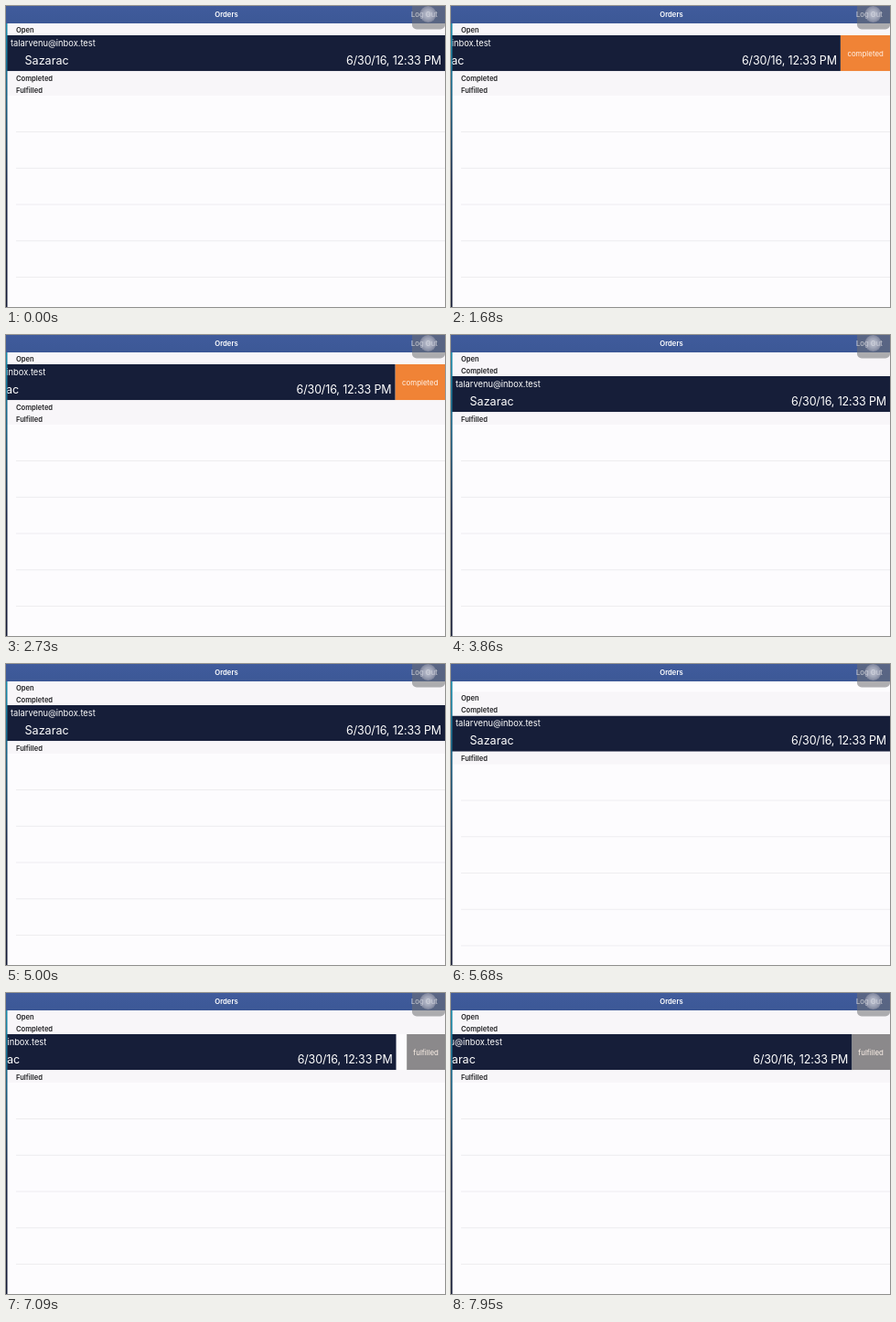
These frames come from a looping animation (480x329 px, 8 s). An HTML page:

```html
<!DOCTYPE html>
<html lang="en">
<head>
<meta charset="utf-8">
<title>Orders</title>
<style>
  html, body { margin: 0; width: 100%; height: 100%; overflow: hidden; background: #fdfcfe; }
  svg { display: block; width: 100vw; height: 100vh; font-family: Inter, "Liberation Sans", sans-serif; }
  .head { font-size: 7.6px; font-weight: 600; fill: #202023; }
  .nav { font-size: 7.7px; }
  .email { font-size: 9.3px; }
  .drink { font-size: 12.6px; }
  .date { font-size: 12.5px; letter-spacing: -.15px; }
  .action { font-size: 7.9px; fill: #fff3ea; text-anchor: middle; }
</style>
</head>
<body>
<svg viewBox="0 0 480 329">
  <defs>
    <linearGradient id="bar" x2="0" y2="1">
      <stop stop-color="#405b9c"/><stop offset="1" stop-color="#3c5896"/>
    </linearGradient>
    <linearGradient id="edge" x2="0" y2="1">
      <stop stop-color="#1694b5"/><stop offset=".3" stop-color="#176184"/>
      <stop offset=".6" stop-color="#182444"/><stop offset="1" stop-color="#141a35"/>
    </linearGradient>
    <radialGradient id="knob">
      <stop stop-color="#e2e3ea"/><stop offset=".55" stop-color="#b9bccb"/>
      <stop offset="1" stop-color="#8a8fa4"/>
    </radialGradient>
    <clipPath id="cell"><rect width="480" height="39.2"/></clipPath>
  </defs>

  <rect width="480" height="329" fill="#fdfcfe"/>
  <g id="list">
    <g id="lines" stroke="#e7e6ea" stroke-width=".7"></g>
    <rect y="19" width="480" height="79" fill="#f8f6f9"/>
    <text class="head" x="11" y="28.8">Open</text>
    <text class="head" x="11" id="completedHead">Completed</text>
    <text class="head" x="11" y="94.5">Fulfilled</text>
    <g id="row">
      <g clip-path="url(#cell)">
        <rect width="480" height="39.2" fill="#fdfcfe"/>
        <g id="action">
          <rect id="actionBox" width="110" height="39.2"/>
          <text id="actionText" class="action" y="23"></text>
        </g>
        <g id="content" fill="#fff">
          <rect width="480" height="39.2" fill="#161e39"/>
          <text class="email" x="5" y="11.6">talarvenu@inbox.test</text>
          <text class="drink" x="20.5" y="32">Sazarac</text>
          <text class="date" x="476" y="31.6" text-anchor="end">6/30/16, 12:33 PM</text>
        </g>
      </g>
    </g>
  </g>

  <rect width="1.5" height="329" fill="url(#edge)"/>
  <rect width="480" height="19" fill="url(#bar)"/>
  <text class="nav" x="241" y="11.8" text-anchor="middle" font-weight="600" fill="#fff">Orders</text>
  <text class="nav" x="443" y="11.8" fill="#d3d9e8">Log Out</text>
  <rect x="444" y="-10" width="36" height="35.5" rx="5" fill="#707074" opacity=".55"/>
  <circle cx="461.5" cy="9" r="9" fill="url(#knob)" opacity=".75"/>
  <text class="nav" x="443" y="11.8" fill="#dfe3ee" opacity=".5">Log Out</text>
</svg>
<script>
const LOOP = 8000;
const MOVE_TIME = 3250;
const byId = id => document.getElementById(id);
const move = (id, x, y) => byId(id).setAttribute("transform", `translate(${x} ${y})`);

// Keys are [time, value] pairs, eased in and out between neighbours.
function track(t, keys) {
  let [t0, v0] = keys[0];
  for (const [t1, v1] of keys) {
    if (t < t1) {
      const p = Math.max(0, (t - t0) / (t1 - t0));
      return v0 + (v1 - v0) * p * p * (3 - 2 * p);
    }
    [t0, v0] = [t1, v1];
  }
  return v0;
}

const openSwipe = [[650, 0], [1500, 54], [2000, 54.5]];
const completedSwipe = [[6550, 0], [6950, 57], [7400, 41.8]];
const pull = [[5250, 0], [5680, 11.5], [5820, 10], [6200, 0]];

for (let i = 0; i < 5; i++) {
  const line = document.createElementNS("http://www.w3.org/2000/svg", "path");
  line.setAttribute("d", `M11 ${137.6 + i * 39.7}H480`);
  byId("lines").append(line);
}

function draw(t) {
  const completed = t >= MOVE_TIME;
  const offset = track(t, completed ? completedSwipe : openSwipe);
  const width = completed ? 41.8 : 54.5;

  move("list", 0, track(t, pull));
  move("row", 0, completed ? 45 : 32);
  byId("completedHead").setAttribute("y", completed ? 41.9 : 81.5);
  move("content", -offset, 0);
  move("action", 480 - Math.min(offset, width), 0);
  byId("actionBox").setAttribute("fill", completed ? "#8b898b" : "#f08336");
  byId("actionText").setAttribute("x", width / 2);
  byId("actionText").textContent = completed ? "fulfilled" : "completed";
}

function tick() {
  draw(performance.now() % LOOP);
  requestAnimationFrame(tick);
}
tick();
</script>
</body>
</html>
```
